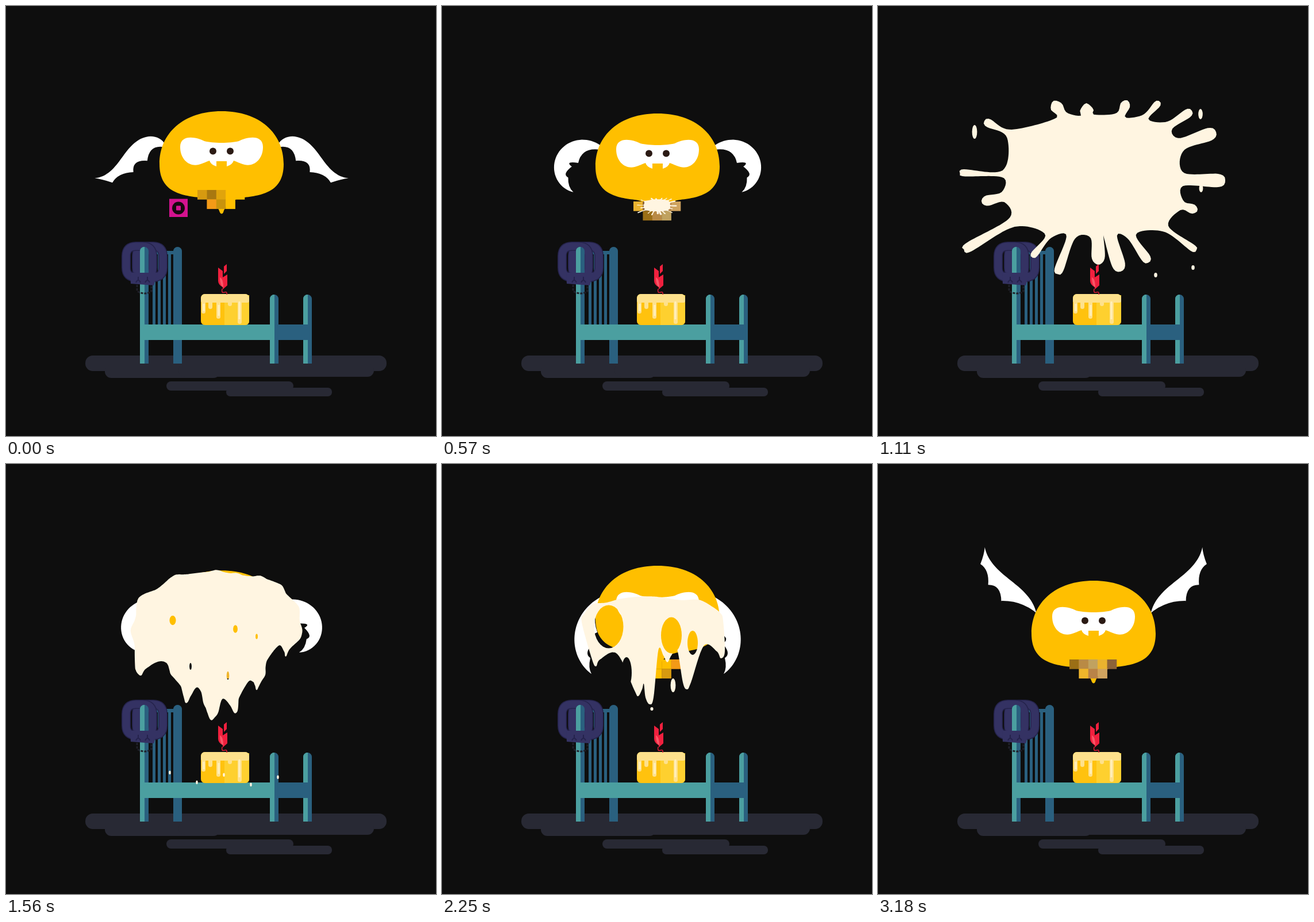
Animation, 748 px wide and 748 px high, one loop 3210 ms. Source, as an HTML page with a canvas:

```html
<!DOCTYPE html>
<html lang="en">
<head>
<meta charset="utf-8">
<title>Night bat</title>
<style>
html, body { margin: 0; width: 100%; height: 100%; overflow: hidden; background: #0e0e0e; }
canvas { display: block; width: 100vmin; height: 100vmin; }
</style>
</head>
<body>
<canvas id="stage" width="748" height="748"></canvas>
<script>
const LOOP = 3210, STEP = 30, SIZE = 748;
const g = document.getElementById('stage').getContext('2d');
const layer = document.createElement('canvas');
layer.width = layer.height = SIZE;
const cream = layer.getContext('2d');

const lerp = (a, b, k) => a + (b - a) * k;
const mix = (a, b, k) => a.map((v, i) => lerp(v, b[i], k));
const clamp = k => Math.max(0, Math.min(1, k));
const span = (t, a, b) => clamp((t - a) / (b - a));
const spline = (a, b, c, d, u) =>
  b + u * (c - a + u * (2 * a - 5 * b + 4 * c - d + u * (3 * (b - c) + d - a))) / 2;

function shape(color, d) { g.fillStyle = color; g.fill(new Path2D(d)); }
function line(color, width, d) {
  g.strokeStyle = color; g.lineWidth = width; g.stroke(new Path2D(d));
}
function rect(color, x, y, w, h, r = 0) {
  g.fillStyle = color; g.beginPath(); g.roundRect(x, y, w, h, r); g.fill();
}
function oval(c, x, y, rx, ry = rx) {
  c.beginPath(); c.ellipse(x, y, rx, ry, 0, 0, 7); c.fill();
}

// Closed smooth outline, resampled evenly so that any two can be blended
function outline(pts, count = 600) {
  const n = pts.length, fine = [], at = [0], out = [];
  for (let i = 0; i < n; i++) {
    const [a, b, c, d] = [n - 1, 0, 1, 2].map(k => pts[(i + k) % n]);
    for (let u = 0; u < 1; u += .125) fine.push(b.map((v, k) => spline(a[k], v, c[k], d[k], u)));
  }
  fine.push(fine[0]);
  for (let i = 1; i < fine.length; i++)
    at[i] = at[i - 1] + Math.hypot(fine[i][0] - fine[i - 1][0], fine[i][1] - fine[i - 1][1]);
  for (let i = 0, j = 1; i < count; i++) {
    const d = at.at(-1) * i / count;
    while (at[j] < d) j++;
    out.push(mix(fine[j - 1], fine[j], (d - at[j - 1]) / (at[j] - at[j - 1])));
  }
  return out;
}

// Boxy core with one round-ended finger towards each tip
const tips = [[180, 341], [143, 290], [185, 200], [305, 165], [362, 169], [434, 164],
  [490, 166], [546, 182], [588, 219], [604, 304], [556, 356], [553, 425], [471, 446],
  [422, 462], [384, 450], [312, 466], [268, 437], [150, 424]];
const splat = outline(tips.flatMap(([x, y], i) => {
  const dx = x - 374, dy = y - 296, len = Math.hypot(dx, dy), ux = dx / len, uy = dy / len;
  const core = len * ((dx / 157) ** 4 + (dy / 106) ** 4) ** -.25;
  const w = 9 + 3 * Math.sin(i * 5);
  const p = (r, side) => [374 + ux * r - uy * side, 296 + uy * r + ux * side];
  return [p(core, -w), p(len - w, -w), p(len, 0), p(len - w, w), p(core, w)];
}));

// Dome with drips along its lower edge; k melts it from high to low
const drips = [[482, 342, 485, 338], [427, 394, 426, 392], [390, 432, 392, 345],
  [352, 448, 361, 418], [314, 410, 341, 404], [242, 362, 268, 352]];
function coat(k) {
  const rx = lerp(145, 123, k), ry = lerp(112, 43, k), cy = lerp(300, 275, k), pts = [];
  for (let i = 0; i <= 10; i++) {
    const c = Math.cos(Math.PI * i / 10), s = Math.sin(Math.PI * i / 10);
    pts.push([366 - rx * Math.sign(c) * Math.abs(c) ** .8, cy - ry * s ** .8 + 3 * Math.sin(i * 2.4)]);
  }
  const ends = drips.map(d => mix(d.slice(0, 2), d.slice(2), k));
  ends.forEach(([x, y], i) => {
    pts.push([x + 7, y - 12], [x, y], [x - 7, y - 12]);
    const next = ends[i + 1];
    if (next) pts.push([(x + next[0]) / 2, Math.min(y, next[1]) - 22]);
  });
  return outline(pts);
}
const freshCoat = coat(0);

// Holes: x, y, rx, ry
const holes = [[290, 272, 17, 25], [399, 287, 12, 21], [436, 300, 6, 14], [321, 352, 6, 18], [386, 368, 7, 22]];

// Loose drops by the time they are largest: x, y, half height
const drops = {
  1110: [[168, 219, 12], [561, 188, 9], [562, 317, 7], [483, 468, 4], [548, 455, 4]],
  1890: [[306, 191, 6], [426, 191, 7], [475, 197, 5], [210, 281, 16], [424, 408, 8]],
  2250: [[402, 385, 12], [365, 426, 3]],
  2670: [[266, 284, 17], [468, 295, 26], [497, 291, 7], [452, 346, 15], [384, 382, 30],
    [341, 368, 12], [365, 322, 8], [281, 332, 8]]
};

// One flap: wing angle in degrees at root, middle and tip, then the top of the body
const poses = [[38, 20, 66, 203], [50, -52, 0, 183], [-30, -84, -145, 177], [32, -62, -170, 187], [105, 36, 60, 199]];
// Time and number of poses passed
const flap = [[0, 1], [570, 28], [600, 28], [1890, 95], [2250, 112], [2670, 134], [LOOP, 161]];

function poseAt(t) {
  const i = flap.findIndex(k => k[0] > t), [a, b] = [flap[i - 1], flap[i]];
  const ph = lerp(a[1], b[1], span(t, a[0], b[0])), n = Math.floor(ph);
  const [p, q, r, s] = [4, 5, 6, 7].map(k => poses[(n + k) % 5]);
  return q.map((v, j) => spline(p[j], v, r[j], s[j], ph - n));
}

function wing([root, mid, tip, top]) {
  const N = 40, len = (148 + (root - tip) / 10) / N, edge = [];
  for (let i = 0, x = 275, y = top + 55; i <= N; i++) {
    const s = i / N;
    const a = (root * (1 - s) * (1 - 2 * s) + 4 * mid * s * (1 - s) + tip * s * (2 * s - 1)) * Math.PI / 180;
    edge.push([x, y, a]);
    x -= Math.cos(a) * len; y -= Math.sin(a) * len;
  }
  const at = (s, w) => {
    const [x, y, a] = edge[Math.round(s * N)];
    return [x - Math.sin(a) * w, y + Math.cos(a) * w];
  };
  g.fillStyle = '#fff';
  g.beginPath();
  edge.forEach(([x, y]) => g.lineTo(x, y));
  [[1, 0], [.85, 18], [.66, 31], [.42, 38]].forEach(([s, w], i, all) => {
    const [s2, w2] = all[i + 1] || [0, 0];
    const end = i < 3 ? at(s2, w2) : [285, top + 65];
    g.quadraticCurveTo(...at((s + s2) / 2, (w + w2) * .23), ...end);
  });
  g.fill();
}

function bat(t) {
  const pose = poseAt(t);
  wing(pose);
  g.save();
  g.translate(750, 0); g.scale(-1, 1);
  wing(pose);
  g.restore();
  g.save();
  g.translate(0, pose[3]);
  shape('#ffbf00', `M375 0C441 0 483 38 483 92C483 138 450 146 415 150C395 153 383 160 378 176
    Q375 181 372 176C367 160 355 153 335 150C300 146 267 138 267 92C267 38 309 0 375 0Z`);
  shape('#fff', `M303 62C303 40 330 44 345 52C360 56 390 56 405 52C420 44 447 40 447 62
    C447 85 430 97 415 93C405 90 402 88 396 86Q394 93 384 96V87H366V96Q356 93 354 86
    C348 88 345 90 335 93C320 97 303 85 303 62Z`);
  g.fillStyle = '#2b1a14';
  oval(g, 360, 69.5, 6);
  oval(g, 390, 69.5, 6);
  g.restore();
}

function scene() {
  const teal = '#4b9fa0', blue = '#2a607f', floor = '#282934', cuff = '#343263', edge = '#25234c';
  rect('#0e0e0e', 0, 0, SIZE, SIZE);
  rect(floor, 138, 608, 524, 27, 13);
  rect(floor, 172, 624, 200, 23, 11);
  rect(floor, 300, 622, 340, 23, 11);
  rect(floor, 279, 653, 221, 16, 8);
  rect(floor, 383, 664, 184, 15, 7);

  rect(blue, 291, 419, 15, 203, [7.5, 7.5, 0, 0]);
  rect(blue, 240, 426, 54, 6);
  for (let x = 255; x < 290; x += 9) rect(blue, x, 430, 5, 126);

  const ring = x => {
    const d = `M${x} 418h12q17 0 17 17v20q0 17 -17 17h-12q-17 0 -17 -17v-20q0 -17 17 -17z`;
    line(edge, 16, d);
    line(cuff, 13, d);
  };
  ring(244);
  ring(226);
  for (const [x, y] of [[233, 419], [459, 502], [517, 502]]) {
    rect(blue, x, y, 15, 622 - y, [7.5, 7.5, 0, 0]);
    rect(teal, x, y, 8, 622 - y, [7.5, 0, 0, 0]);
  }
  rect(teal, 233, 554, 228, 27);
  rect(blue, 474, 554, 58, 27);
  shape(cuff, 'M216 464H264L257 486L217 483Z');
  line(edge, 2, 'M230 471v6M246 471v6M226 481q4 -8 8 0M242 481q4 -8 8 0');
  g.setLineDash([4, 2]);
  line('#20202a', 3, 'M228 485V496Q242 504 253 496V486');
  g.setLineDash([]);

  rect('#ffc20e', 339, 501, 84, 54, 7);
  rect('#fed02f', 380, 503, 43, 52, [0, 0, 7, 0]);
  rect('#fee18c', 339, 501, 84, 15, [7, 7, 3, 3]);
  for (const [x, y] of [[340, 535], [352, 527], [366, 544], [386, 522], [403, 553]])
    rect('#fee18c', x, 508, 7, y - 508, 3.5);
  line('#fff0bd', 3, 'M344 518V531M370 520V539M406 514V545');
  line('#d91e36', 1.6, 'M376 492Q374 500 380 498Q385 496 384 502');
  shape('#f0203e', 'M369 455L377 461V489Q369 485 369 478ZM379 453L384 449V461L379 466ZM377 472L385 467V486L377 493Z');
  shape('#f95767', 'M372 472Q378 474 378 490Q372 486 372 472Z');
}

const warm = ['#d69a10', '#a87810', '#e0a40c', '#ffbf00', '#ffbf00', '#f39a17', '#c8930d', '#ffbf00'];
const brown = ['#9b6f16', '#b98a45', '#c0a260', '#eab32f', '#8d6338', '#efb52b', '#b98348', '#cfa35f'];
function mosaic(t) {
  if (t > 2400 && t < 2760) return;
  const early = t < 540, cell = 16.4, tick = t / STEP;
  const set = early || (t > 2100 && t < 2400) ? warm : brown;
  const shift = (set === warm ? tick : tick + 6) * 3;
  for (let i = 0; i < 8; i++) {
    const row = i < 5 ? 0 : 1;
    g.fillStyle = set[(i + shift) % 8];
    g.fillRect(333 + (i - row * 4) * cell, (early ? 320 : 340) + row * cell, cell + .3, cell + .3);
  }
}

function packet(t) {
  if (t >= 270) return;
  const k = t / 270, pink = '#d4128f';
  g.save();
  g.translate(lerp(300, 374, k), lerp(351.5, 372, k));
  rect(pink, -16, -16, 32, 31.5);
  g.fillStyle = '#17080f';
  oval(g, 0, 0, 11);
  rect(pink, -4, -4, 8, 8, 1);
  g.restore();
}

function blob(pts) {
  cream.beginPath();
  pts.forEach(p => cream.lineTo(...p));
  cream.closePath();
  cream.fill();
}

function goo(t) {
  if (t < 570) return;
  const c = cream;
  c.clearRect(0, 0, SIZE, SIZE);
  c.fillStyle = '#fff5e1';
  c.save();
  if (t < 1200) {
    const k = t < 1110 ? span(t, 570, 750) : 1;
    c.translate(374, lerp(349, 317, k));
    c.scale(lerp(.15, 1, k), lerp(.1, 1, k));
    c.translate(-374, -317);
    blob(splat);
  } else if (t < 2650) {
    const cover = 1 - (1 - span(t, 1200, 1890)) ** 3, melt = span(t, 1890, 2250), wear = span(t, 2250, 2650);
    c.translate(0, 30 * wear);
    blob(t < 1890 ? mix2(splat, freshCoat, cover) : coat(melt));
    c.globalCompositeOperation = 'destination-out';
    if (wear) { c.lineWidth = 100 * wear; c.lineJoin = 'round'; c.stroke(); }
    const size = span(t, 1400, 1890) + melt / 2;
    for (const [x, y, rx, ry] of holes) oval(c, x, y + 11 * melt, rx * size, ry * size);
  }
  c.restore();
  const fall = span(t, 1200, 1620);
  if (fall > 0 && fall < 1) for (let i = 0; i < 5; i++)
    oval(c, 285 + i * 47, 445 + i * 17 % 30 + fall * fall * 125, 6 - 5 * fall, 11 - 9 * fall);
  for (const peak in drops) {
    const age = t - peak, s = clamp(1 - Math.abs(age) / 260);
    if (s) for (const [x, y, h] of drops[peak]) oval(c, x, y + age * .06, (2 + h * .2) * s, h * s);
  }
  g.drawImage(layer, 0, 0);
}
function mix2(a, b, k) { return a.map((p, i) => mix(p, b[i], k)); }

const start = performance.now();
function draw() {
  const t = Math.floor((performance.now() - start) % LOOP / STEP) * STEP;
  scene();
  if (t < 690 || t > 1260) { bat(t); mosaic(t); }
  packet(t);
  goo(t);
  requestAnimationFrame(draw);
}
draw();
</script>
</body>
</html>
```
